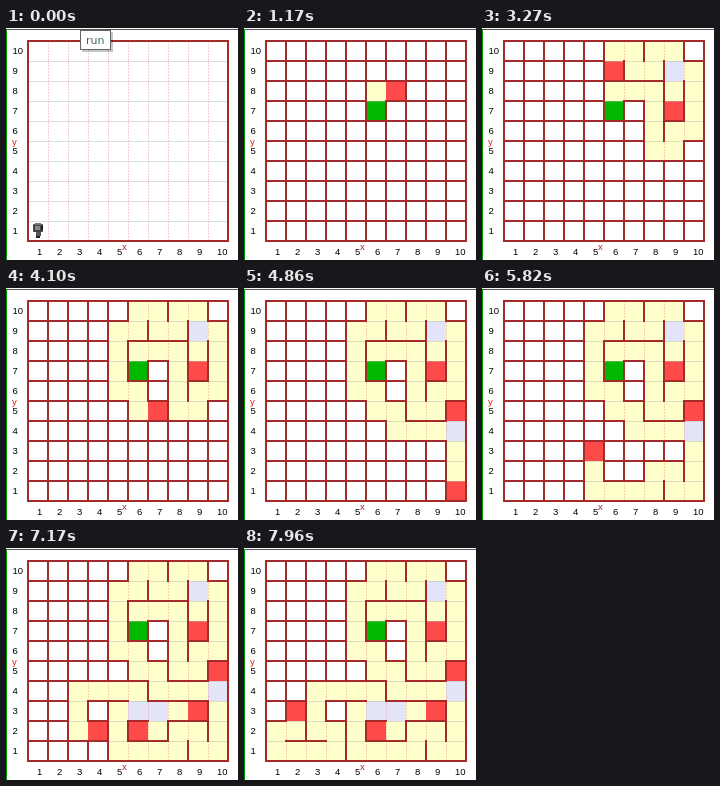
Recreate the animation shown at these times as an HTML page. Size 232 px wide and 232 px high, loop 8000 ms.

```html
<!DOCTYPE html>
<html lang="en">
<head>
<meta charset="utf-8">
<title>Maze builder</title>
<style>
html, body { margin: 0; width: 100%; height: 100%; overflow: hidden; background: #fff; }
svg { display: block; width: 100vw; height: 100vh; }
.label { font: 9.5px "Liberation Sans", Arial, sans-serif; fill: #000; }
.axis { font: 9.5px "Liberation Sans", Arial, sans-serif; fill: #a52a2a; }
.run { font: 11px "DejaVu Sans", sans-serif; fill: #3d6262; }
</style>
</head>
<body>
<svg viewBox="0 0 232 232">
  <rect width="232" height="232" fill="#fff"/>
  <rect y="1" width="232" height="1" fill="#555"/>
  <rect y="1" width="1" height="231" fill="#009600"/>
  <g id="tiles" shape-rendering="crispEdges"></g>
  <g fill="none" shape-rendering="crispEdges">
    <path id="gridV" stroke="#e06060" stroke-opacity=".3" stroke-dasharray="2 1"/>
    <path id="gridH" stroke="#b0b8b0" stroke-opacity=".45"/>
    <path id="walls" stroke="#a52a2a" stroke-width="2" stroke-linecap="square"/>
    <rect x="22" y="13" width="200" height="200" stroke="#a52a2a" stroke-width="2"/>
  </g>
  <g id="labels" class="label"></g>
  <text class="axis" x="116" y="222">x</text>
  <text class="axis" x="6" y="117" style="fill:#e02020">y</text>
  <g id="intro">
    <g id="robot">
      <rect x="27" y="196" width="10" height="8" rx="1" fill="#444"/>
      <rect x="29" y="195" width="6" height="2" fill="#777"/>
      <rect x="29" y="198" width="5" height="4" fill="#888"/>
      <rect x="35" y="198" width="2" height="4" fill="#222"/>
      <rect x="30" y="204" width="5" height="4" fill="#555"/>
      <rect x="30" y="208" width="4" height="2" fill="#222"/>
    </g>
    <rect x="76" y="4" width="31" height="20" fill="#000" opacity=".22"/>
    <rect x="74.5" y="2.5" width="30" height="19" fill="#fff" stroke="#666"/>
    <text class="run" x="80" y="16">run</text>
  </g>
</svg>
<script>
const LOOP = 8000, SIZE = 10, CELL = 20, LEFT = 22, TOP = 13;
const BUILD = 680, BUILD_STEP = 50, START_AT = 980, START = [6, 7];
const COLORS = { start: '#00b800', path: '#ffffcc', end: '#ff4a4a', fork: '#e4e4f8' };
const DIRS = { U: [0, 1], D: [0, -1], L: [-1, 0], R: [1, 0] };

// First step time, last step time, moves; a digit backtracks that many cells.
const ROUTE = [
  [1030, 1030, 'U'], [1170, 1370, 'RRD'], [1510, 1580, 'DD'],
  [1750, 2200, 'RURUUU'], [2340, 2340, 'L'], [2480, 2750, 'DD2UL'],
  [2890, 3270, 'DLULD'], [3410, 3480, 'LD'], [3620, 4310, 'DDRDRDRR'],
  [4440, 5170, 'RU1DDDLUL'], [5270, 5370, 'DL'], [5510, 6240, 'LLUURRRR'],
  [6340, 6340, '2D'], [6480, 7270, 'L3ULLLDDRD'], [7410, 7480, 'LL'],
  [7620, 7820, 'LUR'], [7960, 7960, 'U']
];

const steps = ROUTE.flatMap(([from, to, moves]) => {
  const list = moves.match(/\d?[UDLR]/g);
  const gap = (to - from) / Math.max(1, list.length - 1);
  return list.map((move, i) => ({
    at: Math.round((from + i * gap) / 10) * 10,
    dir: DIRS[move.slice(-1)],
    back: move.length > 1 ? +move[0] : 0
  }));
});

const el = id => document.getElementById(id);
const px = col => LEFT + (col - 1) * CELL;
const py = row => TOP + (SIZE - row) * CELL;

function mazeAt(t) {
  const tiles = new Map(), open = new Set();
  if (t < START_AT) return { tiles, open };
  const paint = (cell, kind) => tiles.set(cell.join(), kind);
  const stack = [START];
  paint(START, 'start');
  for (const { at, dir, back } of steps) {
    if (at > t) break;
    if (back) stack.length -= back;
    const cell = stack[stack.length - 1];
    const next = [cell[0] + dir[0], cell[1] + dir[1]];
    if (stack.length > 1) paint(cell, back ? 'fork' : 'path');
    paint(next, 'end');
    // A wall is keyed by the doubled midpoint of its two cells.
    open.add([cell[0] + next[0], cell[1] + next[1]].join());
    stack.push(next);
  }
  return { tiles, open };
}

function wallPath(open, cols) {
  let d = '';
  for (let c = 1; c <= cols; c++) {
    for (let r = 1; r <= SIZE; r++) {
      if (c < SIZE && !open.has([2 * c + 1, 2 * r].join()))
        d += `M${px(c + 1)} ${py(r)}v${CELL}`;
      if (r < SIZE && !open.has([2 * c, 2 * r + 1].join()))
        d += `M${px(c)} ${py(r)}h${CELL}`;
    }
  }
  return d;
}

function draw(t) {
  const { tiles, open } = mazeAt(t);
  const cols = Math.max(0, Math.min(SIZE, 2 * Math.floor((t - BUILD) / BUILD_STEP)));
  el('intro').style.display = t < BUILD ? '' : 'none';
  el('walls').setAttribute('d', wallPath(open, cols));
  el('tiles').innerHTML = [...tiles].map(([key, kind]) => {
    const [c, r] = key.split(',');
    return `<rect x="${px(+c)}" y="${py(+r)}" width="${CELL}" height="${CELL}" fill="${COLORS[kind]}"/>`;
  }).join('');
}

function drawBoard() {
  let v = '', h = '', labels = '';
  for (let i = 1; i <= SIZE; i++) {
    if (i > 1) {
      v += `M${px(i) + .5} ${TOP}v${SIZE * CELL}`;
      h += `M${LEFT} ${py(i - 1) + .5}h${SIZE * CELL}`;
    }
    labels += `<text x="${px(i) + 9}" y="227">${i}</text><text x="6.5" y="${py(i) + 13}">${i}</text>`;
  }
  el('gridV').setAttribute('d', v);
  el('gridH').setAttribute('d', h);
  el('labels').innerHTML = labels;
}

const marks = [0, 1, 2, 3, 4, 5, 6].map(i => BUILD + i * BUILD_STEP).concat(steps.map(s => s.at));
const origin = performance.now();
let shown = -1;

function tick() {
  const t = (performance.now() - origin) % LOOP;
  const phase = marks.filter(m => m <= t).length;
  if (phase !== shown) {
    shown = phase;
    draw(t);
  }
  requestAnimationFrame(tick);
}

drawBoard();
tick();
</script>
</body>
</html>
```
